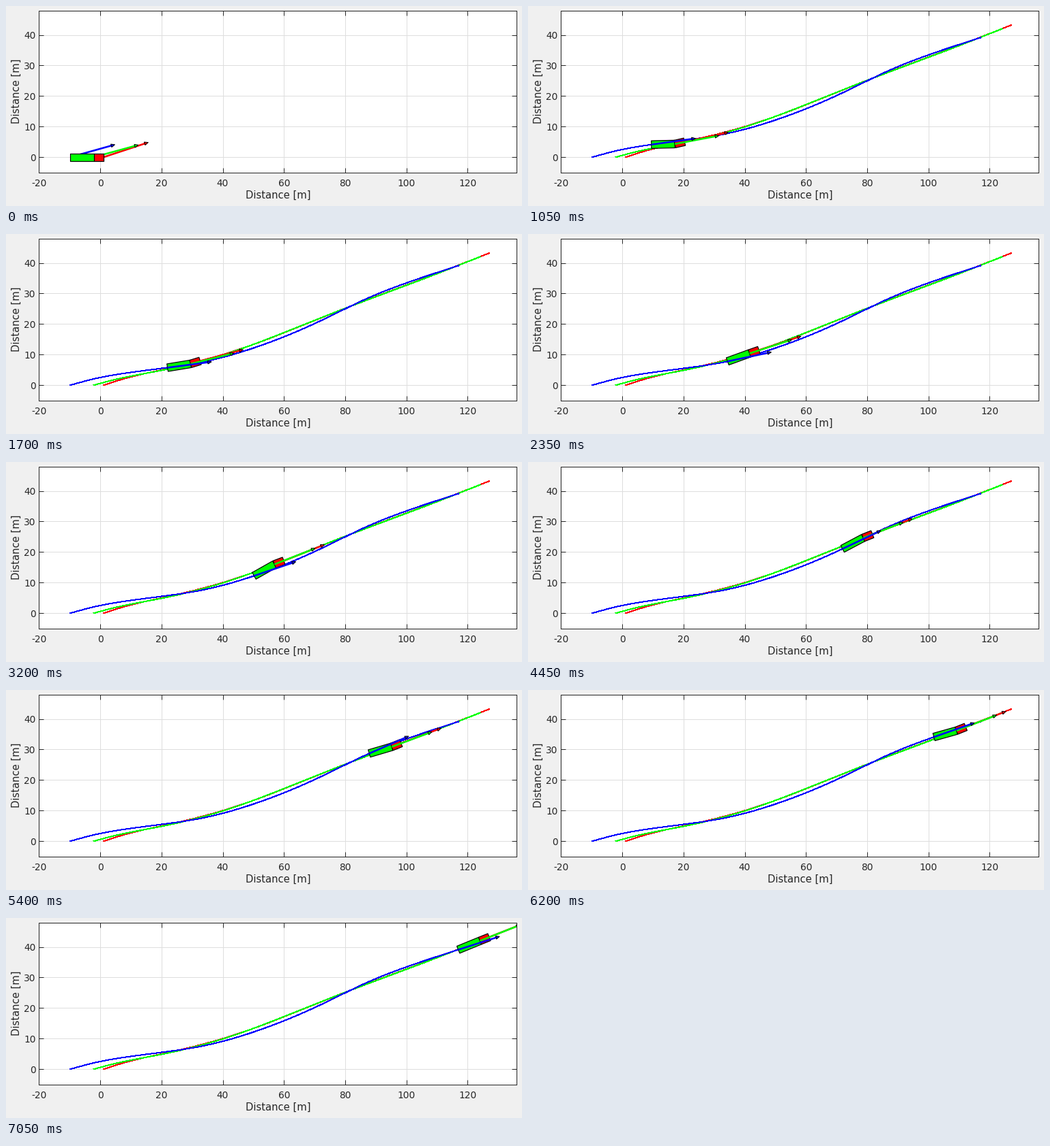
Animation of 756x294 px, one loop 7100 ms. Source, as a matplotlib script:

```python
import numpy as np
import matplotlib.pyplot as plt
from matplotlib.animation import FuncAnimation
from matplotlib.patches import Polygon

W, H, DPI = 756, 294, 100
FRAMES, INTERVAL = 142, 50
PX = 72 / DPI                      # points per pixel
INK = "#262626"
RED, GREEN, BLUE = "#ff0000", "#00ff00", "#0000ff"
TRAILER, TRACTOR, HALF = 7.65, 3.25, 1.25
ARROW_TIME = 15                    # frames of travel shown by an arrow
HEAD, HEAD_HALF = 1.2, 0.52


def spline(x, *keys):
    """Natural cubic spline through (x, y) keys, evaluated at x."""
    kx, ky = np.array(keys, float).T
    h, n = np.diff(kx), len(kx)
    slope = np.diff(ky) / h
    a, r = np.eye(n), np.zeros(n)
    for i in range(1, n - 1):
        a[i, i - 1:i + 2] = h[i - 1], 2 * (h[i - 1] + h[i]), h[i]
        r[i] = 6 * (slope[i] - slope[i - 1])
    m = np.linalg.solve(a, r)
    i = np.clip(np.searchsorted(kx, x) - 1, 0, n - 2)
    d = x - kx[i]
    b = slope[i] - h[i] * (2 * m[i] + m[i + 1]) / 6
    return ky[i] + d * (b + d * (m[i] / 2 + d * (m[i + 1] - m[i]) / (6 * h[i])))


def heading(degrees):
    a = np.radians(degrees)
    return np.column_stack([np.cos(a), np.sin(a)])


# The hitch follows a curve; the tractor settles on its heading
# while the trailer swings about its own. The first pose is held twice.
t = np.arange(1, FRAMES)
x = spline(t, (1, -2.1), (30, 25.75), (60, 53.35), (90, 79.55), (141, 124))
y = spline(x, (-2.1, 0), (6, 2.1), (17, 4.25), (41, 10.2),
           (62, 18), (80, 25.15), (103, 33.8), (124, 42))
trailer_angle = spline(t, (1, 0), (10, -0.3), (21, 1.3), (47, 20),
                       (64, 29.5), (89, 28), (108, 16.5), (141, 22.3))
tractor_angle = 22 * (1 - np.exp(-(t - 1) / 22))

hitch = np.column_stack([x, y])
rear = hitch - TRAILER * heading(trailer_angle)
front = hitch + TRACTOR * heading(tractor_angle)
tracks = [(front, RED), (hitch, GREEN), (rear, BLUE)]
speeds = [np.gradient(p, axis=0) for p, _ in tracks]


def unit(v):
    return v / np.hypot(*v)


def normal(v):
    return np.array([-v[1], v[0]])


def box(a, b):
    n = normal(unit(b - a)) * HALF
    return [a + n, b + n, b - n, a - n]


plt.rcParams["font.family"] = "DejaVu Sans"
fig = plt.figure(figsize=(W / DPI, H / DPI), dpi=DPI, facecolor="#f0f0f0")
ax = fig.add_axes([48.28 / W, 1 - 244.62 / H, 700 / W, 238 / H])
ax.set(xlim=(-20, 136), ylim=(-5, 48),
       xticks=range(-20, 121, 20), yticks=range(0, 41, 10))
ax.set_xticklabels([str(v) for v in range(-20, 121, 20)])
ax.set_axisbelow(True)
ax.grid(color="#dedede", linewidth=PX)
ax.tick_params(direction="in", top=True, right=True, length=7 * PX, width=PX,
               color=INK, labelcolor=INK, labelsize=13.7 * PX)
ax.tick_params(axis="x", pad=9.3 * PX)
ax.tick_params(axis="y", pad=4.5 * PX)
for s in ax.spines.values():
    s.set(color=INK, linewidth=PX)
label = dict(ha="center", va="center", color=INK, fontsize=14.8 * PX)
fig.text(399 / W, 1 - 278 / H, "Distance [m]", **label)
fig.text(15 / W, 1 - 125 / H, "Distance [m]", rotation=90, **label)

paths = [ax.plot(*p.T, color=c, lw=PX, aa=False, zorder=2.1)[0]
         for p, c in tracks]


def patch(color, width, z):
    return ax.add_patch(Polygon(np.zeros((3, 2)), fc=color, ec="black",
                                lw=width * PX, joinstyle="round", zorder=z))


trailer, tractor = patch(GREEN, 1.2, 2.2), patch(RED, 1.2, 2.2)
shafts = [ax.plot([], [], color=c, lw=2.6 * PX, solid_capstyle="butt")[0]
          for _, c in tracks]
heads = [patch(c, 1, 2.3) for _, c in tracks]


def draw(k):
    i = max(k - 1, 0)
    for line in paths:
        line.set_visible(k > 0)
    trailer.set_xy(box(rear[i], hitch[i]))
    tractor.set_xy(box(hitch[i], front[i]))
    z = 2.3 if k > 0 else 2.15     # arrows start out beneath the vehicle
    for j, (shaft, head) in enumerate(zip(shafts, heads)):
        start, v = tracks[j][0][i], speeds[j][i] * ARROW_TIME
        tip, u = start + v, unit(v)
        base, n = tip - HEAD * u, normal(u) * HEAD_HALF
        shaft.set_data(*np.array([start, base]).T)
        head.set_xy([tip, base + n, base - n])
        shaft.set_zorder(z + j * 0.01)
        head.set_zorder(z + j * 0.01 + 0.005)
    return [*paths, trailer, tractor, *shafts, *heads]


anim = FuncAnimation(fig, draw, frames=FRAMES, interval=INTERVAL,
                     repeat=True, repeat_delay=0)
plt.show()
```
